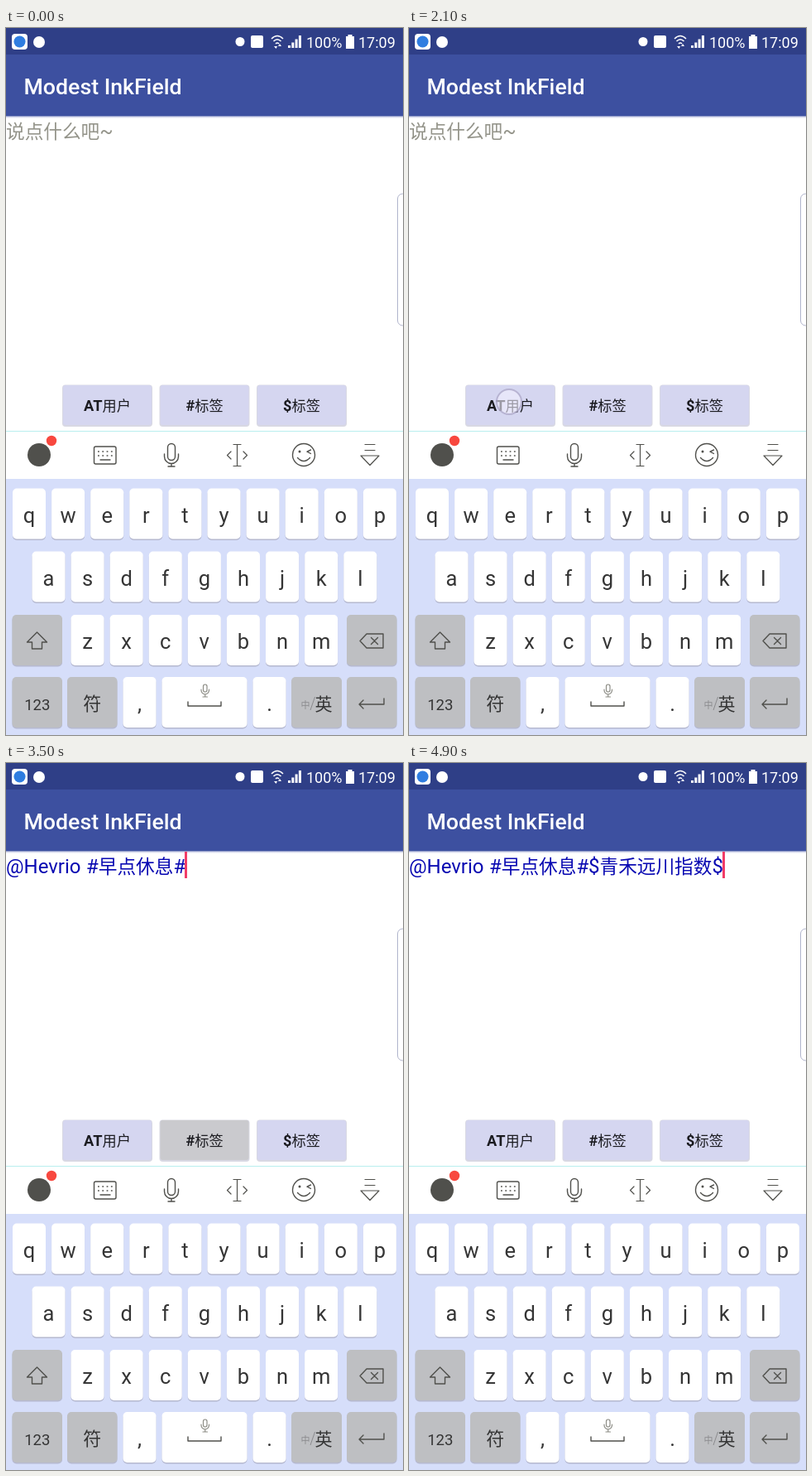
These frames come from a looping animation (480 by 853 pixels, 5000 ms). An HTML page:

```html
<!DOCTYPE html>
<html lang="zh-CN">
<head>
<meta charset="utf-8">
<title>Rich text input</title>
<style>
  html, body { margin: 0; width: 100%; height: 100%; overflow: hidden; background: #fff; }
  svg { display: block; width: 100vw; height: 100vh; }
  text { font-family: Roboto, "Noto Sans CJK SC", "Noto Sans CJK", sans-serif; white-space: pre; }
  .icon { fill: none; stroke: #50504c; stroke-width: 1.4; stroke-linejoin: round; stroke-linecap: round; }
  .fine { stroke-width: 1.2; }
</style>
</head>
<body>
<svg id="stage" viewBox="0 0 480 853">
  <defs>
    <linearGradient id="shade" x2="0" y2="1">
      <stop offset="0" stop-color="#7f8ac0" stop-opacity=".6"/>
      <stop offset="1" stop-color="#d8dcf4" stop-opacity="0"/>
    </linearGradient>
  </defs>
  <rect width="480" height="853" fill="#fff"/>

  <g id="bars">
    <rect width="480" height="32" fill="#2f3f87"/>
    <rect y="32" width="480" height="74.500" fill="#3d50a0"/>
    <rect y="106.500" width="480" height="3" fill="url(#shade)"/>
    <text x="21.5" y="80" font-size="26.67" font-weight="500" fill="#fff">Modest InkField</text>
    <g fill="#fff">
      <rect x="7" y="7" width="19" height="19" rx="4"/>
      <circle cx="16.5" cy="16.5" r="7" fill="#2f7de0"/>
      <circle cx="40" cy="17" r="7"/>
      <circle cx="283" cy="16.5" r="5.5"/>
      <rect x="296" y="9" width="15" height="15" rx="2"/>
      <path d="M341 24V21H344V24ZM345.300 24V17.500H348.300V24ZM349.600 24V13.500H352.600V24ZM353.900 24V9H356.900V24Z"/>
      <path d="M411 10H413.500V8H418.500V10H421V25H411Z"/>
      <path d="M324 22L326.500 25L328 22ZM329 22L331 19L333 22Z"/>
      <path d="M321 13Q328 6 335 13M323.500 16Q328 11.500 332.500 16M326 19Q328 17 330 19" fill="none" stroke="#fff" stroke-width="1.5"/>
      <text x="363" y="23.500" font-size="18">100%</text>
      <text x="426" y="23.500" font-size="18">17:09</text>
    </g>
  </g>

  <rect x="473.500" y="200" width="20" height="159" rx="6" fill="#fff" stroke="#b0b4cc"/>
  <g id="editor"></g>
  <rect id="cursor" y="107" width="3" height="32" fill="#f23d68"/>
  <g id="buttons"></g>

  <g id="toolbar">
    <path d="M0 486.500H480" stroke="#b9eeee"/>
    <circle cx="40" cy="515" r="14" fill="#50504c"/>
    <circle cx="55" cy="498" r="6.200" fill="#f8483f"/>
    <g class="icon">
      <rect x="106.500" y="505" width="26.500" height="21" rx="2"/>
      <path d="M111 511H129M111 516H129" stroke-dasharray="1.800 3.500" stroke-linecap="butt"/>
      <path d="M114 521H126"/>
      <rect x="195.500" y="501.500" width="9" height="20" rx="4.500"/>
      <path d="M191.500 514V517A8.500 8.500 0 0 0 208.500 517V514M200 525.500V529M196 529H204"/>
      <path d="M275 502.500H284M279.500 502.500V528.500M275 528.500H284M272 511L267.500 515.500L272 520M287 511L291.500 515.500L287 520" class="fine"/>
      <circle cx="360" cy="515" r="13.500"/>
      <path d="M352.500 518.500Q360 526.500 367.500 518.500M368.500 509L364 511.200L368.500 513.500"/>
      <circle cx="355" cy="511" r=".8" fill="#50504c"/>
      <path d="M434 502.500H446M434 509.500H446M429 516H451L440 527.500Z" class="fine"/>
    </g>
  </g>

  <rect y="544" width="480" height="309" fill="#d6defa"/>
  <g id="keys"></g>
  <g class="icon">
    <path d="M37.500 729L49.500 741H43.500V749H31.500V741H25.500Z"/>
    <path d="M428 739.500L436 731H456V748H436ZM441.500 735.500L449.500 743.500M449.500 735.500L441.500 743.500"/>
    <path d="M220 813V818H260V813"/>
    <path d="M457 809V816H427M432 811L427 816L432 821"/>
    <g stroke="#8d8d86" stroke-width="1.200">
      <rect x="238.500" y="792" width="4.500" height="9" rx="2.200"/>
      <path d="M236 798V799A4.700 4.700 0 0 0 245.500 799V798M240.700 804V807M238 807H243.500"/>
    </g>
  </g>
  <circle id="touch" r="15" fill="#f4f0ff" fill-opacity=".6" stroke="#a9a4c6" stroke-opacity=".75" stroke-width="2"/>
</svg>

<script>
const LOOP = 5000;
const LATIN = 24, HAN = 22.67;
const byId = id => document.getElementById(id);

function add(parent, tag, attrs, content = "") {
  const node = document.createElementNS("http://www.w3.org/2000/svg", tag);
  for (const [name, value] of Object.entries(attrs)) node.setAttribute(name, value);
  node.textContent = content;
  return parent.appendChild(node);
}

// Han glyphs run slightly smaller than the Latin around them.
function mixedText(parent, attrs, content, latin, han, latinWeight = 400) {
  const node = add(parent, "text", attrs);
  for (const run of content.match(/[\u4e00-\u9fff]+|[^\u4e00-\u9fff]+/g)) {
    const isHan = /[\u4e00-\u9fff]/.test(run);
    add(node, "tspan", {
      "font-size": isHan ? han : latin,
      "font-weight": isHan ? 400 : latinWeight
    }, run);
  }
  return node;
}

const line = (x, content, fill) =>
  mixedText(byId("editor"), { x, y: 132.5, fill }, content, LATIN, HAN);
const hint = line(0, "说点什么吧~", "#94948a");

const tags = [
  { start: 2100, x: 0, end: 96.5, text: "@Hevrio", label: "AT用户", left: 69, touch: [121, 451] },
  { start: 3100, x: 97, end: 216, text: "#早点休息#", label: "#标签", left: 186.5, touch: [240, 453] },
  { start: 3900, x: 217, end: 379, text: "$青禾远川指数$", label: "$标签", left: 304, touch: [357, 453] }
];
const IDLE = [213, 214, 240], PRESSED = [202, 202, 206];

for (const tag of tags) {
  const parent = byId("buttons");
  add(parent, "rect", { x: tag.left - 1, y: 430.5, width: 109, height: 50.5, rx: 4, fill: "#cfcfdc", opacity: 0.8 });
  tag.face = add(parent, "rect", { x: tag.left, y: 431, width: 107, height: 48, rx: 3 });
  mixedText(parent, { x: tag.left + 53.5, y: 461.5, fill: "#1b1b20", "text-anchor": "middle" },
    tag.label, 18.2, 17.2, 700);
  tag.node = line(tag.x, tag.text, "#0909b2");
}

const keys = byId("keys");
const GREY = "#bebfc2";
function key(x, y, width, label = "", fill = "#fff", size = 25.5) {
  add(keys, "rect", { x, y: y + 1.5, width, height: 61, rx: 5, fill: "#b6b9d0" });
  add(keys, "rect", { x, y, width, height: 61, rx: 5, fill });
  add(keys, "text", {
    x: x + width / 2, y: y + (size > 24 ? 41 : 40), "font-size": size,
    "text-anchor": "middle", fill: "#353535"
  }, label);
}
const letterRow = (letters, x, y) =>
  [...letters].forEach((letter, i) => key(x + i * 47.1, y, 40, letter));

letterRow("qwertyuiop", 8, 555.5);
letterRow("asdfghjkl", 31.5, 631.5);
letterRow("zxcvbnm", 78.5, 708);
key(7.5, 708, 60.5, "", GREY);
key(412, 708, 60.5, "", GREY);
key(7.5, 783, 60.5, "123", GREY, 18.5);
key(74, 783, 60.5, "符", GREY, 22);
key(141.5, 783, 40, ",");
key(188.5, 783, 103);
key(298.5, 783, 40, ".");
key(345, 783, 61, "", GREY);
key(412, 783, 60.5, "", GREY);
add(keys, "text", { x: 356.5, y: 821, "font-size": 11, fill: "#8b8b8e" }, "中");
add(keys, "path", { d: "M368 823L373.500 807", stroke: "#8b8b8e", fill: "none" });
add(keys, "text", { x: 373.5, y: 822.5, "font-size": 21, fill: "#353535" }, "英");

const clamp = v => Math.max(0, Math.min(1, v));
const within = (t, from, to) => t >= from && t < to;
const show = (node, on) => node.setAttribute("visibility", on ? "visible" : "hidden");

const cursorOn = [[100, 200], [700, 1200], [1700, 2100], [2400, 2900], [3400, 3900], [4200, 4700], [4900, 5000]];
const cursor = byId("cursor"), touch = byId("touch");

function render(t) {
  let caret = 0, finger = null;
  for (const tag of tags) {
    const age = t - tag.start;
    const inserted = age >= 300;
    show(tag.node, inserted);
    if (inserted) caret = tag.end;
    if (within(age, 0, 300)) finger = tag.touch;

    const press = Math.min(clamp((age - 50) / 300), clamp((800 - age) / 350));
    const color = IDLE.map((c, i) => Math.round(c + (PRESSED[i] - c) * press));
    tag.face.setAttribute("fill", `rgb(${color})`);
  }
  show(hint, caret === 0);
  cursor.setAttribute("x", caret);
  show(cursor, cursorOn.some(([from, to]) => within(t, from, to)));
  show(touch, finger !== null);
  if (finger) touch.setAttribute("transform", `translate(${finger})`);
}

const begin = performance.now();
function tick() {
  render((performance.now() - begin) % LOOP);
  requestAnimationFrame(tick);
}
tick();
</script>
</body>
</html>
```
